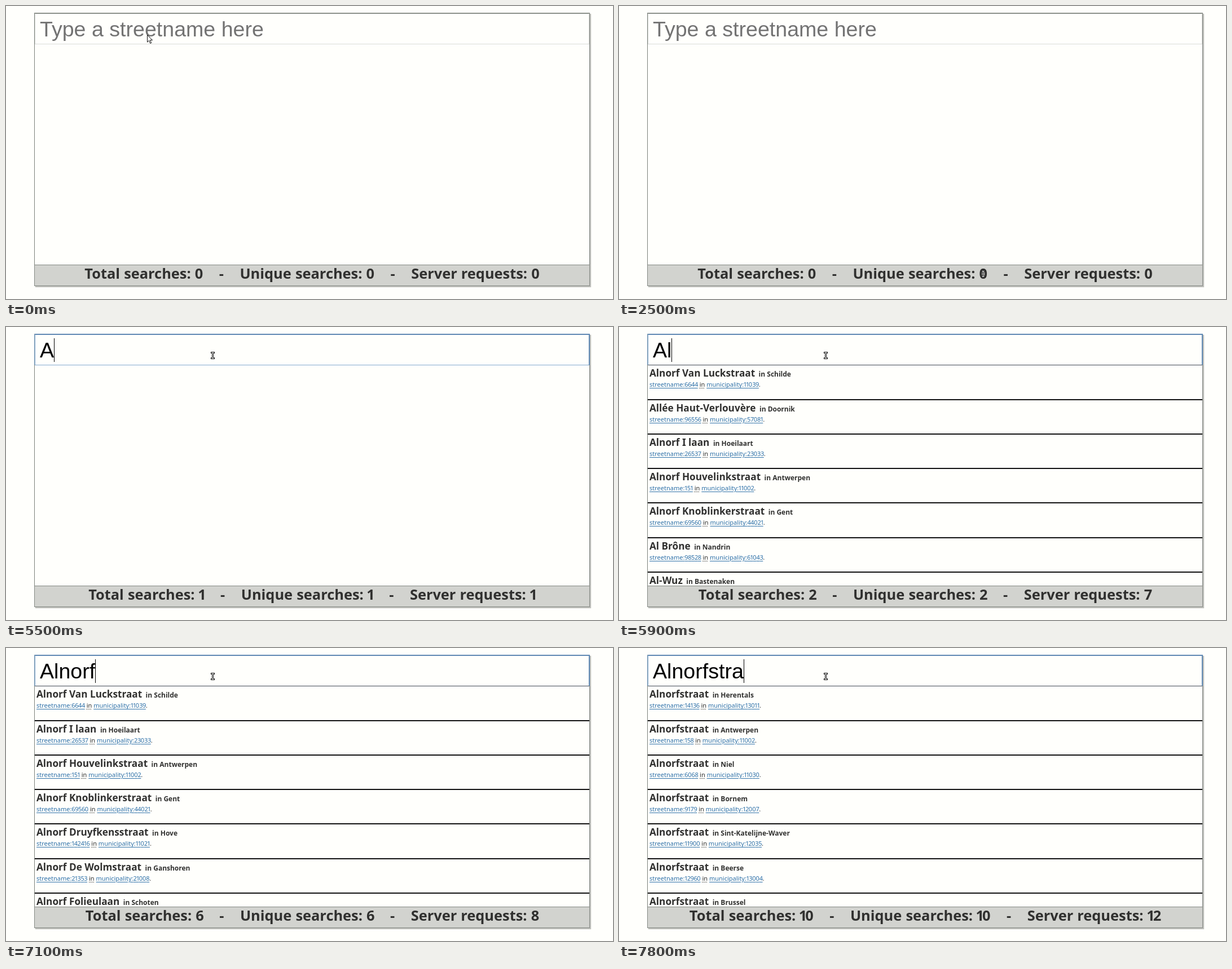
An HTML page for the animation above (8000 ms loop, 1076 px wide and 520 px high).

```html
<!DOCTYPE html>
<html lang="en">
<head>
<meta charset="utf-8">
<title>Street name search</title>
<style>
html, body { margin: 0; width: 100%; height: 100%; overflow: hidden; background: #fffffc; }
body { position: relative; font-family: "Noto Sans", sans-serif; color: #30302f; }
div, svg { position: absolute; box-sizing: border-box; white-space: pre; }
i { font-style: normal; }
#panel { left: 50px; top: 12px; width: 985px; height: 485px; border: 1px solid #7c817b; box-shadow: 2px 2px 1px #c0c1bd; }
#field { left: 51px; top: 13px; width: 983px; height: 55px; border: 1px solid #d9dbd8; border-top-color: #9a9f99; }
#field.focus { border-color: #5f88b3 #5f88b3 #85abd0 #85abd0; box-shadow: 1px -1px #5f88b3, -1px -1px #7b97ae; }
#field.open { border-bottom-color: #414a57; }
#input { left: 60px; top: 20px; font: 37.6px/42px "Liberation Sans", Arial, sans-serif; color: #000; }
#hint { color: #737373; }
#caret { display: inline-block; width: 1px; height: 42px; margin-right: -1px; vertical-align: top; background: #000; }
#list { left: 51px; top: 68.25px; width: 983px; height: 391px; overflow: hidden; }
.row { left: 0; width: 100%; height: 61.25px; border-bottom: 2px solid #111; }
.title { left: 3px; top: 0; font: bold 17.2px/28px "Noto Sans", sans-serif; }
.title span { font-size: 12px; margin-left: 6.5px; }
.links { left: 3px; top: 27px; font-size: 11px; line-height: 14px; }
.links u { color: #2d70a8; text-underline-offset: 1.5px; }
.links abbr { text-decoration: underline dotted; text-underline-offset: 1.5px; }
#footer { left: 50px; top: 459px; width: 985px; height: 38px; border: 1px solid #858a84; background: #d2d3cf;
  font: bold 25.4px/29px "Noto Sans", sans-serif; word-spacing: .02em; text-align: center; }
/* proportional figures */
.digit { letter-spacing: -.04em; }
.d0 { letter-spacing: 0; }
.d1 { letter-spacing: -.12em; margin-left: -.06em; }
</style>
</head>
<body>
<div id="panel"></div>
<div id="list"></div>
<div id="field"></div>
<div id="input"><span id="typed"></span><i id="caret"></i><span id="hint">Type a streetname here</span></div>
<div id="footer"></div>
<svg id="cursor" width="12" height="18">
  <path id="arrow" d="M.5.5v12.6l3-2.8 2.2 5 2-.9-2.2-4.8h4z" fill="#fff" stroke="#111"/>
  <g id="beam" fill="none">
    <path d="M1 1.5h7M4.5 1v11M1 11.5h7" stroke="#111" stroke-width="3"/>
    <path d="M2 1.5h5M4.5 1v11M2 11.5h5" stroke="#fff"/>
  </g>
</svg>
<script>
const $ = id => document.getElementById(id);
const LOOP = 8000, TICK = 100;

// title | town | street id | municipality id
const luck = 'Alnorf Van Luckstraat|Schilde|6644|11039';
const first = 'Alnorf I laan|Hoeilaart|26537|23033';
const houvelink = 'Alnorf Houvelinkstraat|Antwerpen|151|11002';
const knoblinker = 'Alnorf Knoblinkerstraat|Gent|69560|44021';
const druyfkens = 'Alnorf Druyfkensstraat|Hove|142416|11021';
const wolm = 'Alnorf De Wolmstraat|Ganshoren|21353|21008';
const folieu = 'Alnorf Folieulaan|Schoten|31027|11040';
const same = rows => rows.map(row => 'Alnorfstraat|' + row);

const results = {
  none: [],
  a: ['Aardwikkelstraat|Gent|69512|44021', 'Abelkruidlaan|Hove|6210|11021', 'Achterzwindel|Antwerpen|163|11002',
    'Akkerduifpad|Schilde|6638|11039', 'Ambervinkstraat|Niel|6074|11030', 'Appelwendel|Bornem|9164|12007', 'Asterhoekje|Beerse|12955|13004'],
  al: [luck, 'Allée Haut-Verlouvère|Doornik|96556|57081', first, houvelink, knoblinker,
    'Al Brône|Nandrin|98528|61043', 'Al-Wuz|Bastenaken|85204|82003'],
  aln: [luck, first, houvelink, knoblinker, 'Alnakkerstraat|Hove|14230|11021', wolm, folieu],
  name: [luck, first, houvelink, knoblinker, druyfkens, wolm, folieu],
  street: same(['Herentals|14136|13011', 'Antwerpen|158|11002', 'Niel|6068|11030', 'Bornem|9179|12007',
    'Sint-Katelijne-Waver|11900|12035', 'Beerse|12960|13004', 'Brussel|20104|21004'])
};

// time, typed text, result list, searches, server requests
const states = [
  [0, '', 'none', 0, 0],
  [5500, 'A', 'none', 1, 1],
  [5600, 'A', 'a', 1, 1],
  [5700, 'A', 'a', 1, 6],
  [5900, 'Al', 'al', 2, 7],
  [6300, 'Aln', 'aln', 3, 7],
  [6500, 'Alno', 'name', 4, 8],
  [6800, 'Alnor', 'name', 5, 8],
  [7100, 'Alnorf', 'name', 6, 8],
  [7300, 'Alnorfs', 'none', 7, 9],
  [7400, 'Alnorfs', 'street', 7, 10],
  [7500, 'Alnorfst', 'street', 8, 11],
  [7700, 'Alnorfstr', 'street', 9, 11],
  [7800, 'Alnorfstra', 'street', 10, 12]
];

// time, x, y
const path = [
  [0, 250, 51], [100, 253, 54], [400, 253, 54], [500, 213, 73],
  [900, 521, 244], [1300, 372, 390], [1600, 281, 477], [1700, 281, 477], [1800, 296, 470], [1900, 296, 470],
  [2200, 460, 321], [2400, 681, 400], [2500, 645, 475], [2700, 645, 475], [2900, 714, 388], [3000, 714, 388],
  [3200, 800, 383], [3500, 945, 479], [3600, 945, 479], [4100, 366, 50], [LOOP, 366, 50]
];

const digits = text => String(text).replace(/\d/g, d => `<i class="digit d${d}">${d}</i>`);

function rowHtml(row, index) {
  const [title, town, street, municipality] = row.split('|');
  return `<div class="row" style="top:${index * 61.25}px">` +
    `<div class="title">${title}<span>in ${town}</span></div>` +
    `<div class="links"><u>streetname:${digits(street)}</u> <abbr>in</abbr> ` +
    `<u>municipality:${digits(municipality)}</u>.</div></div>`;
}

let shown;
function showState(state) {
  if (state === shown) return;
  shown = state;
  const [, text, list, searches, requests] = state;
  $('typed').textContent = text;
  $('hint').hidden = text !== '';
  $('list').innerHTML = results[list].map(rowHtml).join('');
  $('footer').innerHTML = [`Total searches: ${searches}`, `Unique searches: ${searches}`, `Server requests: ${requests}`]
    .map(digits).join('    -    ');
}

function showCursor(t) {
  const next = path.findIndex(point => point[0] > t);
  const [t0, x0, y0] = path[next - 1], [t1, x1, y1] = path[next];
  const k = (t - t0) / (t1 - t0);
  const x = Math.round(x0 + (x1 - x0) * k), y = Math.round(y0 + (y1 - y0) * k);
  const overText = t >= 100 && (y < 67 || y > 462);
  $('arrow').style.display = overText ? 'none' : '';
  $('beam').style.display = overText ? '' : 'none';
  $('cursor').style.left = x - (overText ? 4 : 0) + 'px';
  $('cursor').style.top = y - (overText ? 6 : 0) + 'px';
  $('cursor').style.visibility = t >= 600 && t < 900 ? 'hidden' : 'visible';
}

function render(t) {
  const state = states.findLast(s => s[0] <= t);
  showState(state);
  showCursor(t);
  $('field').className = (t >= 4300 ? 'focus ' : '') + (state[2] === 'none' ? '' : 'open');
  $('caret').style.visibility = t >= 4300 && t < 5000 || t >= 5500 ? 'visible' : 'hidden';
}

const start = performance.now();
function frame() {
  const t = (performance.now() - start) % LOOP;
  render(Math.floor(t / TICK) * TICK);
  requestAnimationFrame(frame);
}
frame();
</script>
</body>
</html>
```
